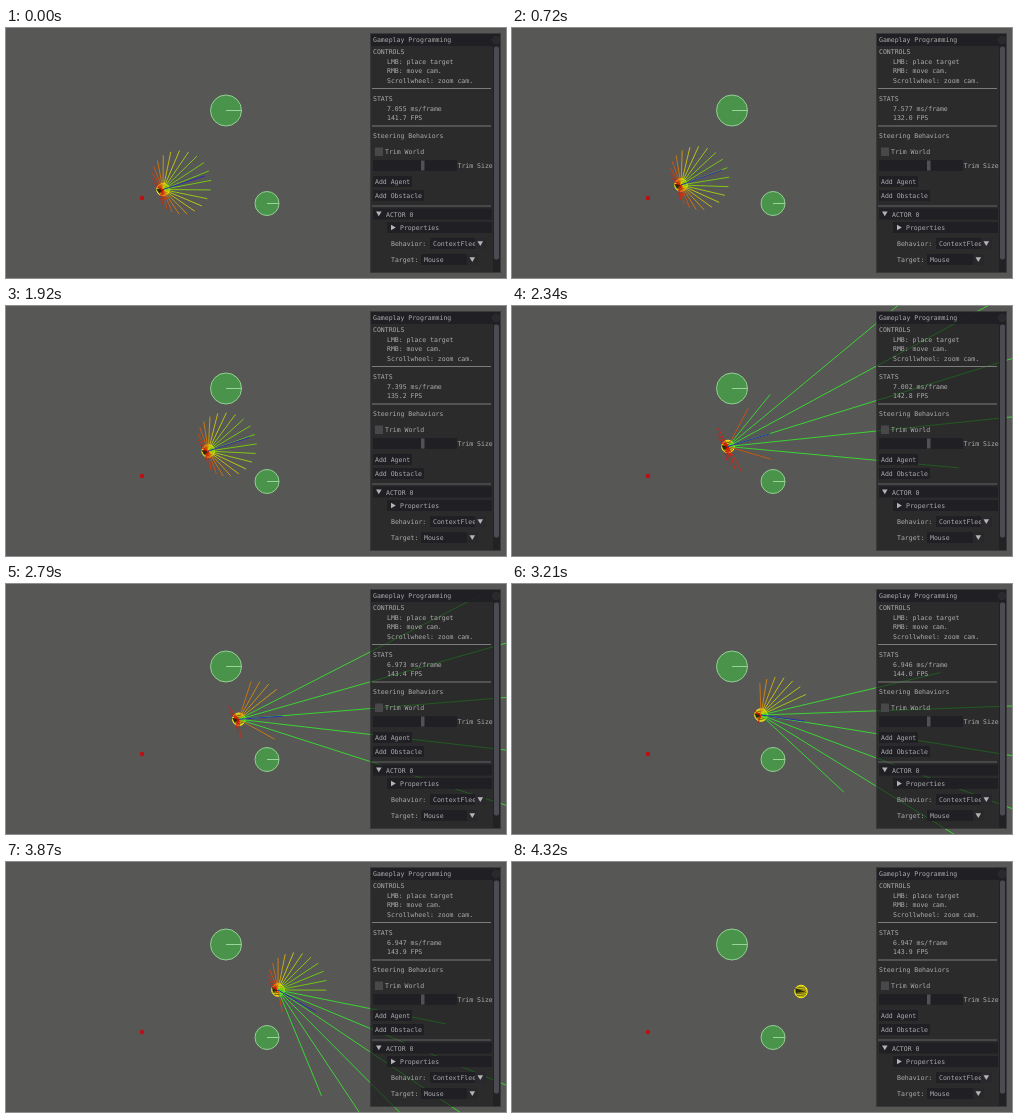
An HTML page with a canvas for the animation above (4.35 s loop, 500x250 px).

```html
<!DOCTYPE html>
<html lang="en">
<head>
<meta charset="utf-8">
<title>Steering behaviors</title>
<style>
  html, body { margin: 0; width: 100%; height: 100%; overflow: hidden; background: #575755; }
  canvas, svg { position: absolute; left: 0; top: 0; width: 500px; height: 250px; display: block; }
  text { font: 6.5px "DejaVu Sans Mono", "Noto Sans Mono", monospace; fill: #acacae; white-space: pre; }
  .frame { fill: #202024; }
  .soft { fill: #48484b; }
  .arrow { fill: #b4b4b6; }
  .rule { stroke: #7c7c7e; stroke-width: 1; }
</style>
</head>
<body>
<canvas id="world" width="500" height="250"></canvas>
<svg viewBox="0 0 500 250">
  <rect x="364.5" y="5.5" width="130" height="239" fill="#111114" fill-opacity=".62" stroke="#38383b" stroke-width=".8"/>
  <rect class="frame" x="365" y="6" width="129" height="12" fill-opacity=".9"/>
  <path d="M485 12 L488 8 H492 L494 10 V14 L492 16 H488 Z" fill="#2a2a2d"/>
  <rect x="487" y="18" width="7" height="226" fill="#202024" fill-opacity=".8"/>
  <rect x="488" y="18.5" width="5" height="213" rx="2" fill="#4b4b53"/>

  <text x="367" y="14.3">Gameplay Programming</text>
  <text x="367" y="26">CONTROLS</text>
  <text x="381" y="35.8">LMB: place target</text>
  <text x="381" y="45.3">RMB: move cam.</text>
  <text x="381" y="54.8">Scrollwheel: zoom cam.</text>
  <path class="rule" d="M366 60.5 H485 M366 98 H485"/>
  <text x="367" y="73.3">STATS</text>
  <text x="381" y="82.8" id="ms"></text>
  <text x="381" y="92.3" id="fps"></text>
  <text x="367" y="109.8">Steering Behaviors</text>

  <rect class="soft" x="369" y="119.5" width="8" height="8.5"/>
  <text x="379" y="126.4">Trim World</text>
  <rect class="frame" x="367" y="132" width="84" height="11"/>
  <rect x="415" y="132.5" width="3.5" height="10" fill="#505055"/>
  <text x="451.5" y="140">Trim Size</text>

  <rect class="frame" x="367" y="148" width="39" height="11"/>
  <text x="369" y="156.2">Add Agent</text>
  <rect class="frame" x="367" y="162" width="51" height="11"/>
  <text x="369" y="170.2">Add Obstacle</text>
  <path class="rule" d="M366 178 H485" stroke-opacity=".7"/>

  <rect class="frame" x="367" y="180.5" width="119" height="11"/>
  <path class="arrow" d="M370 183.5 h5.6 l-2.8 4.8 z"/>
  <text x="380" y="188.5">ACTOR 0</text>
  <rect class="frame" x="381" y="194" width="105" height="11"/>
  <path class="arrow" d="M385 196.7 v5.6 l4.8 -2.8 z"/>
  <text x="394" y="202">Properties</text>

  <text x="385" y="218.4">Behavior:</text>
  <rect class="frame" x="424" y="210" width="55.5" height="11"/>
  <text x="427" y="218.4">ContextFlee</text>
  <rect x="469" y="210" width="10.5" height="11" fill="#2a272d"/>
  <path class="arrow" d="M471.5 213.3 h5.6 l-2.8 4.6 z"/>
  <text x="385" y="234.4">Target:</text>
  <rect class="frame" x="415" y="226" width="57" height="11"/>
  <text x="418" y="234.4">Mouse</text>
  <rect x="461" y="226" width="11" height="11" fill="#28282b"/>
  <path class="arrow" d="M463.5 229.3 h5.6 l-2.8 4.6 z"/>
</svg>
<script>
const LOOP = 4350, STEP = 30, AVOID_FROM = 2200, RAYS_UNTIL = 4200;
const RAYS = 32, REACH = 49.5, RAD = Math.PI / 180;
const target = { x: 136, y: 170 };
const obstacles = [{ x: 220, y: 82.5, r: 15.5 }, { x: 261, y: 175.5, r: 12 }];

// Key rows: time, agent x, agent y, heading in degrees
const path = [
  [0, 157, 161.5, -22], [720, 169, 157, -20.5], [1410, 187, 150.5, -22],
  [2340, 216, 140.5, -17.2], [3210, 249, 131, -13.3], [3870, 272, 128, 0.15],
  [4320, 289, 129.5, 5], [4350, 290.1, 129.7, 5.3]
];
const steer = [[0, -18], [720, -20], [1410, -20], [2340, -17], [3210, 8], [3870, 30], [4350, 42]];
const gap = [[0, -20], [2340, -20.5], [3210, 14], [3870, 39], [4350, 56]];
const heat = [[0, 1], [2190, 1], [2220, .55], [2340, .55], [3210, .9], [3870, 1], [4350, 1]];
const frameMs = [[0, 7.055], [720, 7.577], [1410, 7.873], [2340, 7.002], [3210, 6.946], [3870, 6.947], [4350, 6.947]];

const ctx = document.getElementById('world').getContext('2d');
const msText = document.getElementById('ms');
const fpsText = document.getElementById('fps');

function segment(keys, t) {
  let i = 0;
  while (i < keys.length - 2 && t >= keys[i + 1][0]) i++;
  return i;
}

function linear(keys, t) {
  const i = segment(keys, t), a = keys[i], b = keys[i + 1];
  return a[1] + (b[1] - a[1]) * (t - a[0]) / (b[0] - a[0]);
}

// Cubic Hermite curve through one column of the keys
function smooth(keys, t, col) {
  const i = segment(keys, t), a = keys[i], b = keys[i + 1];
  const slope = k => {
    const p = keys[Math.max(0, k - 1)], n = keys[Math.min(keys.length - 1, k + 1)];
    return (n[col] - p[col]) / (n[0] - p[0]);
  };
  const h = b[0] - a[0], u = (t - a[0]) / h, u2 = u * u, u3 = u2 * u;
  return (2 * u3 - 3 * u2 + 1) * a[col] + (u3 - 2 * u2 + u) * h * slope(i)
    + (3 * u2 - 2 * u3) * b[col] + (u3 - u2) * h * slope(i + 1);
}

function disk(x, y, r, fill, stroke) {
  ctx.beginPath();
  ctx.arc(x, y, r, 0, 2 * Math.PI);
  ctx.fillStyle = fill;
  ctx.fill();
  if (stroke) {
    ctx.strokeStyle = stroke;
    ctx.lineWidth = 1;
    ctx.stroke();
  }
}

function line(x, y, angle, length, color, width = 1) {
  ctx.beginPath();
  ctx.moveTo(x, y);
  ctx.lineTo(x + Math.cos(angle) * length, y + Math.sin(angle) * length);
  ctx.strokeStyle = color;
  ctx.lineWidth = width;
  ctx.stroke();
}

const turn = a => Math.atan2(Math.sin(a), Math.cos(a));

function blocked(x, y, angle) {
  return obstacles.some(o => {
    const dx = o.x - x, dy = o.y - y, d = Math.hypot(dx, dy);
    return d - o.r < REACH &&
      Math.abs(turn(angle - Math.atan2(dy, dx))) < Math.asin(Math.min(1, (o.r + 7) / d));
  });
}

function drawRays(t, x, y, heading) {
  const away = Math.atan2(y - target.y, x - target.x);
  const center = linear(gap, t) * RAD, warmth = linear(heat, t);
  const avoiding = t >= AVOID_FROM;
  for (let k = 0; k < RAYS; k++) {
    const angle = heading + (k - RAYS / 2) * 2 * Math.PI / RAYS;
    if (avoiding && blocked(x, y, angle)) continue;
    const score = (1 + Math.cos(angle - away)) / 2;
    const off = turn(angle - center) / (31 * RAD);
    const boost = avoiding ? 600 * Math.max(0, 1 - off * off) : 0;
    const hue = 90 * Math.pow(score * warmth, 2);
    const color = boost > 20 ? '#36ea2e' : `hsl(${hue} 90% 45%)`;
    line(x, y, angle, REACH * score + boost, color, .85);
  }
  line(x, y, linear(steer, t) * RAD, 44, '#2a2cb4', 1);
}

function drawAgent(x, y, heading) {
  disk(x, y, 6.3, '#c8bc14', '#f4ec20');
  ctx.save();
  ctx.translate(x, y);
  ctx.rotate(heading);
  ctx.fillStyle = '#2c2a0c';
  ctx.beginPath();
  ctx.moveTo(-6, -3);
  ctx.lineTo(5, 0);
  ctx.lineTo(-5, 2);
  ctx.fill();
  for (let i = -4; i <= 4; i += 2) {
    const w = Math.sqrt(30 - i * i);
    ctx.fillRect(-w, i, 2 * w, .5);
  }
  ctx.restore();
}

function draw(t) {
  ctx.fillStyle = '#575755';
  ctx.fillRect(0, 0, 500, 250);
  for (const o of obstacles) {
    disk(o.x, o.y, o.r, '#4a934a', '#93cf93');
    line(o.x, o.y, 0, o.r, '#9ad49a');
  }
  disk(target.x, target.y, 2.2, '#bf0e14');

  const x = smooth(path, t, 1), y = smooth(path, t, 2), heading = smooth(path, t, 3) * RAD;
  drawAgent(x, y, heading);
  if (t < RAYS_UNTIL) drawRays(t, x, y, heading);

  const ms = linear(frameMs, t);
  msText.textContent = ms.toFixed(3) + ' ms/frame';
  fpsText.textContent = (1000 / ms).toFixed(1) + ' FPS';
}

const start = performance.now();
function tick() {
  const t = (performance.now() - start) % LOOP;
  draw(Math.floor(t / STEP) * STEP);
  requestAnimationFrame(tick);
}
tick();
</script>
</body>
</html>
```
